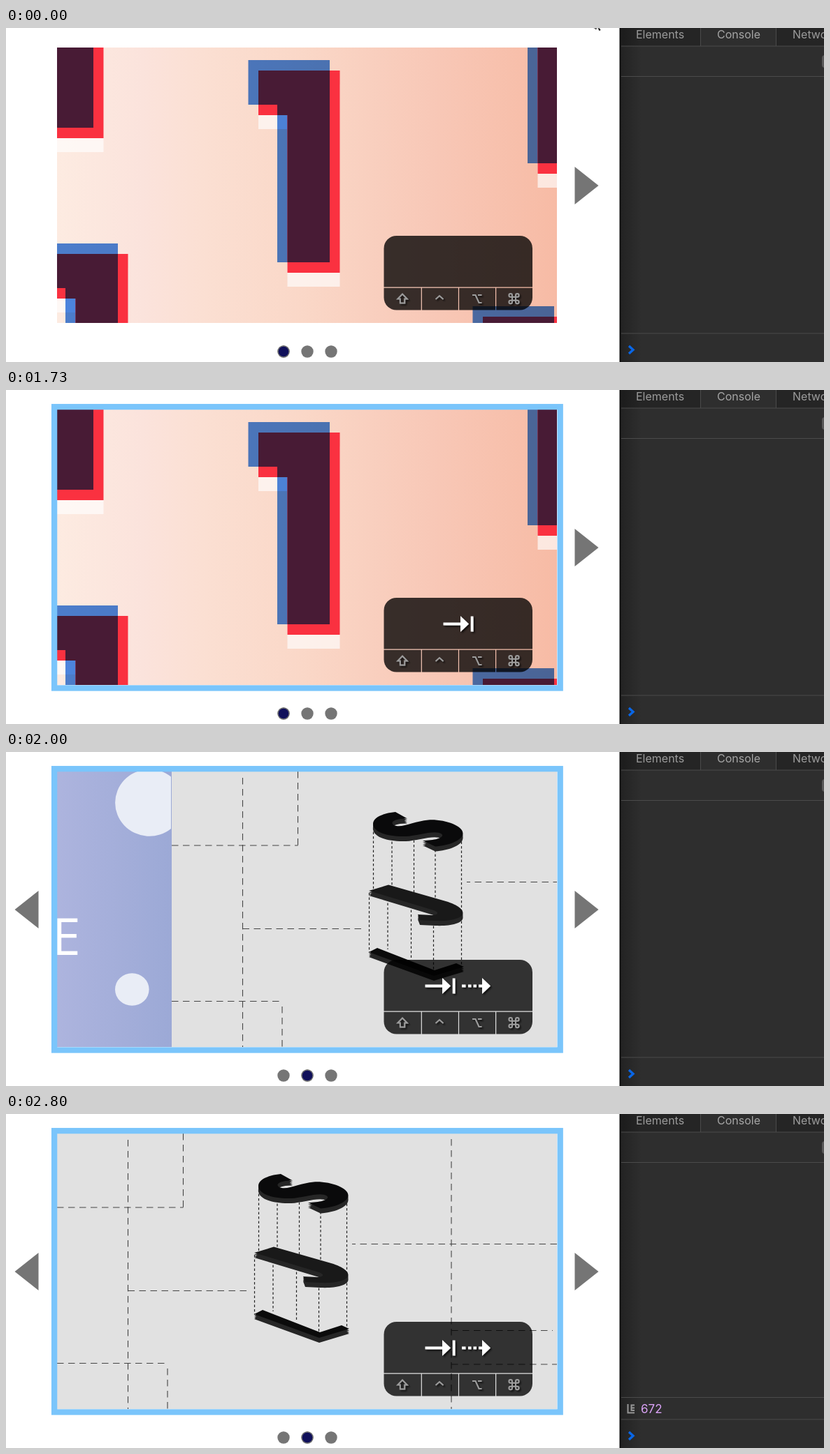
An HTML page that plays this animation: 1170x479 px, repeating every 3.19 s.

```html
<!DOCTYPE html>
<html lang="en">
<head>
<meta charset="utf-8">
<title>Carousel keyboard test</title>
<style>
  html, body { margin: 0; width: 100%; height: 100%; overflow: hidden; background: #fff; }
  svg { display: block; width: 100vw; height: 100vh; }
  text { font-family: Inter, sans-serif; }

  .cursor, .ring, .tab, .right, .prev, .log, .late, .strip, .active {
    animation: 3190ms step-end infinite;
  }
  .cursor { animation-name: cursor; }
  .ring { animation-name: ring; }
  .tab { animation-name: tab; }
  .right { animation-name: right; }
  .prev { animation-name: prev; }
  .late { animation-name: late; }
  .log { animation-name: log; }
  .strip { animation-name: scroll; }
  .active { animation-name: active; }

  @keyframes cursor { 0% { opacity: 1 } 22.88%, 100% { opacity: 0 } }
  @keyframes ring { 0% { opacity: 0 } 25.07%, 100% { opacity: 1 } }
  @keyframes tab {
    0% { opacity: 0; transform: translateX(0) }
    22.88% { opacity: 1; transform: translateX(0) }
    56.42%, 100% { opacity: 1; transform: translateX(-26px) }
  }
  @keyframes right { 0% { opacity: 0 } 56.42%, 100% { opacity: 1 } }
  @keyframes prev { 0% { opacity: 0 } 58.62%, 100% { opacity: 1 } }
  @keyframes active { 0% { transform: none } 58.62%, 100% { transform: translateX(34px) } }
  /* the later slides are painted only once the scroll is under way */
  @keyframes late { 0% { opacity: 0 } 60.5%, 100% { opacity: 1 } }
  @keyframes log { 0% { opacity: 0 } 68.96%, 100% { opacity: 1 } }
  @keyframes scroll {
    0% { transform: translateX(0) }
    56.42% { transform: translateX(-243px) }
    58.62% { transform: translateX(-715px) }
    60.5% { transform: translateX(-1030px) }
    62.69% { transform: translateX(-1266px) }
    64.89% { transform: translateX(-1373px) }
    66.77% { transform: translateX(-1420px) }
    68.96%, 100% { transform: translateX(-1430px) }
  }
</style>
</head>
<body>
<svg viewBox="0 0 1170 479" preserveAspectRatio="none">
  <defs>
    <linearGradient id="peach">
      <stop offset="0" stop-color="#fdebe1"/>
      <stop offset=".17" stop-color="#fbe3dc"/>
      <stop offset=".3" stop-color="#fbdfd2"/>
      <stop offset=".5" stop-color="#fad7c7"/>
      <stop offset=".75" stop-color="#f8c8b7"/>
      <stop offset="1" stop-color="#f7bba5"/>
    </linearGradient>
    <linearGradient id="lilac">
      <stop offset=".77" stop-color="#adb4de"/>
      <stop offset="1" stop-color="#9ca9d6"/>
    </linearGradient>
    <linearGradient id="shade">
      <stop offset="0" stop-color="#000" stop-opacity=".25"/>
      <stop offset="1" stop-color="#000" stop-opacity="0"/>
    </linearGradient>
    <filter id="drop" x="-20%" y="-40%" width="150%" height="200%">
      <feDropShadow dx="2" dy="2" stdDeviation="1" flood-color="#000" flood-opacity=".7"/>
    </filter>
    <clipPath id="view"><rect x="73" y="28" width="715" height="395"/></clipPath>
    <clipPath id="keyShape"><rect x="540.5" y="298" width="212.5" height="106.5" rx="18"/></clipPath>

    <path id="one" d="M346.5 46H463V336H388V110H346.5z"/>
    <clipPath id="inOne"><use href="#one"/></clipPath>
    <g id="digit">
      <use href="#one" x="14.5" y="35" fill="#fff" opacity=".65"/>
      <use href="#one" fill="#4c88e6" style="mix-blend-mode:multiply"/>
      <use href="#one" x="14.5" y="15" fill="#fa3140"/>
      <g clip-path="url(#inOne)"><use href="#one" x="14.5" y="15" fill="#481b35"/></g>
    </g>

    <path id="s" d="M393 86L410 95.5C392 95 384 101 391 105C402 110 420 99 440 97.500C463 96 490 106 489.500 117C488 128 468 134 450 135.500L432 127C452 127 464 122 459 117.500C450 111 425 120 408 121C382 122 361 115 361 103C361 94 374 88 393 86z"/>
    <path id="j" d="M355 199L383 190.500L465 214C484 220 489.500 226 489.500 231C489 239 470 243 450 242L428 241L425 233L446 234C456 233 455 229 446 226.500z"/>
    <path id="l" d="M355 287L367 281L449 313L480 303L491 308L448 321z"/>
    <path id="head" d="M0-11.500L12 0L0 11.500z"/>
  </defs>

  <rect width="1170" height="479" fill="#fff"/>

  <g clip-path="url(#view)">
    <g class="strip">
      <g>
        <rect x="73" y="28" width="715" height="395" fill="url(#peach)"/>
        <use href="#digit"/>
        <use href="#digit" x="-338" y="-193"/>
        <use href="#digit" x="-303" y="263"/>
        <use href="#digit" x="358" y="-142"/>
        <use href="#digit" x="321" y="353"/>
      </g>

      <g class="late">
        <g transform="translate(1266)">
          <rect x="-478" y="28" width="715" height="395" fill="url(#lilac)"/>
          <g fill="#e9edf6">
            <path d="M236 35.500V110A49 48 0 1 1 236 35.500z"/>
            <ellipse cx="180.300" cy="340.500" rx="24.300" ry="23.300"/>
          </g>
          <text x="66" y="291" font-size="73" fill="#fff" style="font-family:'Open Sans',sans-serif">E</text>
        </g>

        <g transform="translate(1430)">
          <rect x="73" y="28" width="715" height="395" fill="#e1e1e1"/>
          <path d="M174.500 37V423M637 36V423M253.500 28V134M73 134H253.500M174.500 253.500H347M73 357.500H231M231 365V423M788 186.500H495M637 310.500H782M637 359H788"
                fill="none" stroke="#444" stroke-width="1.100" stroke-dasharray="9.500 6.500"/>
          <path d="M361.500 108V200M388 122V195M419.500 120V203M450 140V222M487.500 122V232M355.500 202V288M382 210V283M415.500 220V297M447.500 243V314M487.500 236V306"
                fill="none" stroke="#222" stroke-width="1.200" stroke-dasharray="3.500 3"/>
          <g fill="#262626">
            <use href="#s" y="2.500"/><use href="#s" y="5"/><use href="#s" y="7"/>
            <use href="#j" y="2.500"/><use href="#j" y="5"/><use href="#j" y="7"/>
            <use href="#l" y="2.500"/><use href="#l" y="5"/><use href="#l" y="7"/>
          </g>
          <use href="#s" fill="#0a0a0b"/>
          <use href="#j" fill="#191919"/>
          <use href="#l" fill="#0b0b0b"/>
        </g>
      </g>
    </g>
  </g>

  <rect class="ring" x="69.100" y="24.100" width="723.600" height="403.400" fill="none" stroke="#7ac5fb" stroke-width="8.300"/>

  <g fill="#757575">
    <path class="prev" d="M46.500 199L12.500 226L46.500 253z"/>
    <path d="M813.500 199L847.500 226L813.500 253z"/>
    <circle cx="397" cy="464" r="8.700"/>
    <circle cx="431" cy="464" r="8.700"/>
    <circle cx="465" cy="464" r="8.700"/>
  </g>
  <circle class="active" cx="397" cy="464" r="8" fill="#10105a" stroke="#757575" stroke-width="1.300"/>

  <!-- key press display -->
  <g clip-path="url(#keyShape)" fill="#000" fill-opacity=".78">
    <path d="M540 298H753V371.500H540zM540 372.700H593.700V405H540zM594.900 372.700H646.900V405H594.900zM648.100 372.700H700V405H648.100zM701.200 372.700H753V405H701.200z"/>
  </g>
  <g fill="none" stroke="#9d9d9d" stroke-width="2" filter="url(#drop)">
    <path d="M567 381.500L573.800 388.500H570.200V394.500H563.800V388.500H560.200z"/>
    <path d="M614.500 389L620 384L625.500 389"/>
    <path d="M667 383H671.500L676.500 394H680.500M675 383H680.500"/>
    <path d="M724 391V383.400a2.300 2.300 0 1 0-2.300 2.300H731.300a2.300 2.300 0 1 0-2.300-2.300V393a2.300 2.300 0 1 0 2.300-2.300H721.700a2.300 2.300 0 1 0 2.300 2.300z"/>
  </g>
  <g class="tab">
    <g fill="#fff" filter="url(#drop)">
      <path d="M625.500 333.500H651V337.500H625.500zM664.700 324.500H668.500V346.500H664.700z"/>
      <use href="#head" x="650" y="335.500"/>
    </g>
  </g>
  <g class="right">
    <g fill="#fff" filter="url(#drop)">
      <path d="M652 333.500h5.500v4h-5.500zM661 333.500h4.500v4h-4.500zM668.500 333.500h4.500v4h-4.500zM676 333.500h6v4h-6z"/>
      <use href="#head" x="681" y="335.500"/>
    </g>
  </g>

  <!-- developer tools -->
  <rect x="878" width="292" height="479" fill="#2e2e2e"/>
  <path d="M880 0H993V26H880zM1102 0H1170V26H1102z" fill="#252525"/>
  <rect x="879" width="30" height="479" fill="url(#shade)"/>
  <rect x="877.500" width="1.800" height="479" fill="#0c0c0c"/>
  <path d="M880 26H1170M880 69.500H1170M880 438H1170M993.500 0V26M1101.500 0V26" stroke="#4b4b4b"/>
  <g font-size="16" fill="#9b9b9b">
    <text x="901" y="15">Elements</text>
    <text x="1017" y="15" fill="#a6a6a6">Console</text>
    <text x="1125" y="15">Network</text>
  </g>
  <rect x="1167" y="39" width="20" height="18" rx="4" fill="#585858"/>
  <path d="M891 456L897 461.500L891 467" fill="none" stroke="#0966e6" stroke-width="3.400"/>
  <g class="log">
    <path d="M880 406.500H1170" stroke="#4b4b4b"/>
    <path d="M889.500 416V428.500H899M893.500 417.500H899M894.500 421.500H899M893.500 425H899M894.500 416.500V426" fill="none" stroke="#969696" stroke-width="2"/>
    <text x="908" y="428.500" font-size="17" fill="#dba3f7">672</text>
  </g>

  <path class="cursor" d="M840 0L844 2.500L846 0L848.500 4.500L851 3L849 0z" fill="#111" stroke="#fff" stroke-width=".7"/>
</svg>
</body>
</html>
```
